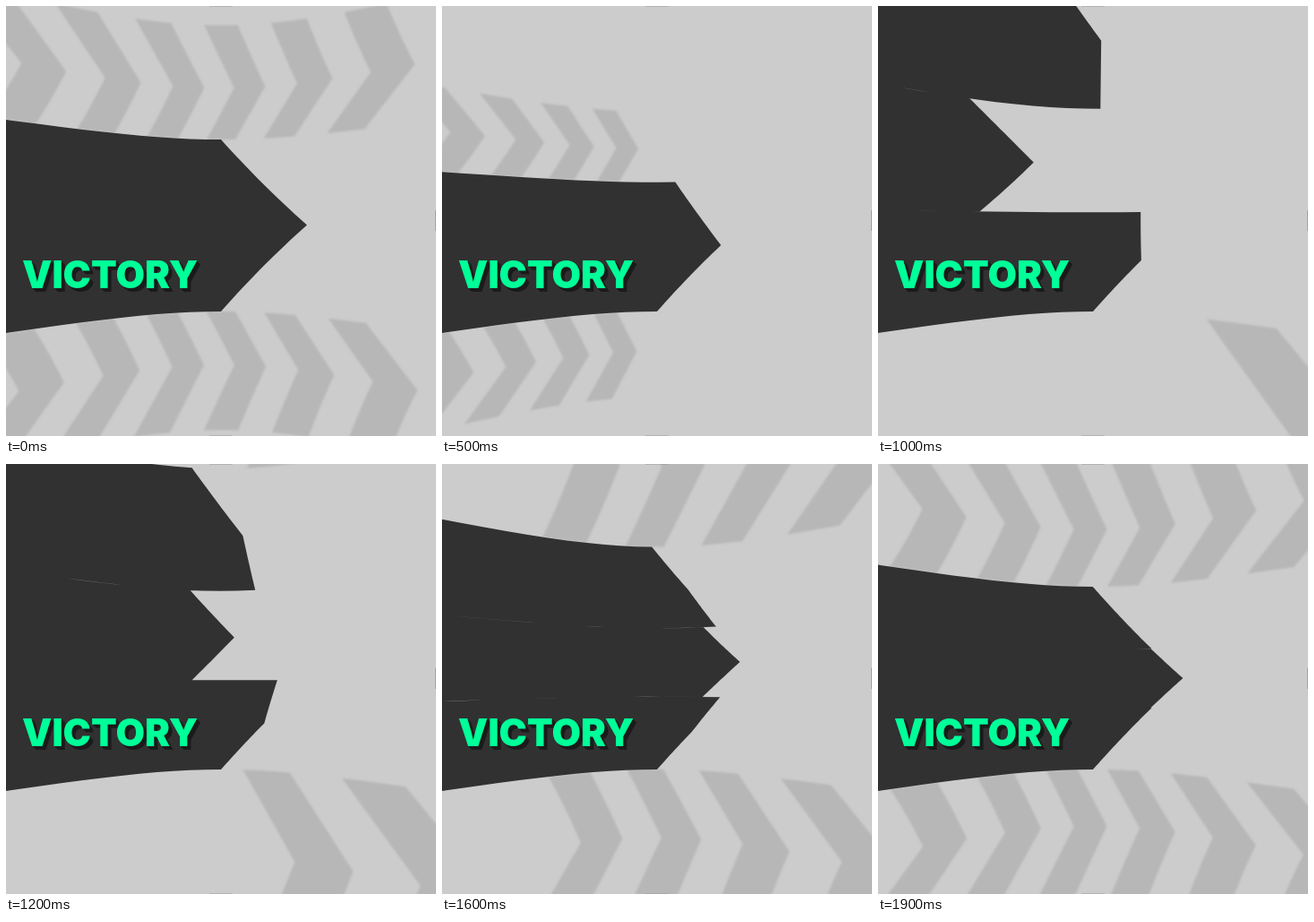
An HTML page with a canvas for the animation above (2 s loop, 480x480 px).

```html
<!DOCTYPE html>
<html lang="en">
<head>
<meta charset="utf-8">
<title>Victory</title>
<style>
  html, body { margin: 0; height: 100%; overflow: hidden; background: #ccc; }
  canvas { display: block; width: 100vw; height: 100vh; }
</style>
</head>
<body>
<canvas id="stage" width="480" height="480"></canvas>
<script>
const ctx = document.getElementById('stage').getContext('2d');
const LOOP = 2000, STEP = 100;
const CENTER = 240, BULGE = 7.7e-6;   // barrel lens over the whole stage
const FLOOR = 94.5, LEFT = -260;      // flat coordinates, relative to the centre
const ARROW = 180.5;                  // arrow height at the start of the loop

// Everything shrinks to a third per loop, towards the floor line.
const zoom = p => ARROW * 3 ** -p;
const easeInOut = p => (1 - Math.cos(Math.PI * p)) / 2;

function lens(x, y) {
  const k = 1 + BULGE * (x * x + y * y);
  return [CENTER + x * k, CENTER + y * k];
}

// Adds a polygon in flat coordinates, its edges bent by the lens.
function addShape(points) {
  points.forEach(([x, y], i) => {
    const [nextX, nextY] = points[(i + 1) % points.length];
    for (let u = 0; u < 1; u += 1 / 16) {
      const spot = lens(x + (nextX - x) * u, y + (nextY - y) * u);
      if (i || u) ctx.lineTo(...spot);
      else ctx.moveTo(...spot);
    }
  });
  ctx.closePath();
}

function addArrow(x, bottom, size, bottomSkew, topSkew) {
  addShape([
    [LEFT, bottom],
    [x + bottomSkew * size, bottom],
    [x + size / 2, bottom - size / 2],
    [x + topSkew * size, bottom - size],
    [LEFT, bottom - size]
  ]);
}

// Three stacked arrows join into one that is three times as high.
function drawArrows(p) {
  const size = zoom(p), whole = 3 * size;
  const skew = easeInOut(p), lag = whole * (1 - p) ** 2;
  ctx.fillStyle = '#313131';
  ctx.beginPath();
  addArrow(0, FLOOR, size, 0, skew);
  addArrow(size - 2.8 * lag, FLOOR - size, size, 0, 0);
  addArrow(-0.57 * lag, FLOOR - 2 * size, size, skew, 0);
  ctx.fill();
}

function addChevron(x, y, dir, size) {
  const half = size / 4, width = size / 6, push = size * 0.155;
  addShape([
    [x, y],
    [x + width, y],
    [x + width + push, y + dir * half],
    [x + width, y + dir * half * 2],
    [x, y + dir * half * 2],
    [x + push, y + dir * half]
  ]);
}

// Six chevrons above and below the arrow; p = 0 when they are centred.
function drawChevrons(p) {
  const size = zoom(p);
  const shift = -p * (2.75 + 0.58 * Math.exp(3.6 * p));
  ctx.beginPath();
  for (let n = -3; n <= 2; n++) {
    const x = size * (shift + n * 0.33 - 1 / 12);
    addChevron(x, FLOOR, 1, size);
    addChevron(x, FLOOR - size, -1, size);
  }
  ctx.fill();
}

function drawTitle() {
  ctx.font = '900 42px Inter, sans-serif';
  ctx.fillStyle = '#1b1b1b';
  for (let i = 4; i > 0; i--) ctx.fillText('VICTORY', 18 + i, 315 + i);
  ctx.fillStyle = '#00ff99';
  ctx.fillText('VICTORY', 18, 315);
}

function draw(p) {
  ctx.fillStyle = '#ccc';
  ctx.fillRect(0, 0, 480, 480);

  ctx.fillStyle = '#b7b7b7';
  ctx.filter = 'blur(1.2px)';
  drawChevrons(p - 1);
  drawChevrons(p);
  ctx.filter = 'none';

  drawArrows(p);

  // Slivers of the round rim
  ctx.fillStyle = '#999';
  ctx.fillRect(227, 0, 26, 0.5);
  ctx.fillRect(227, 479.5, 26, 0.5);
  ctx.fillRect(479.2, 228, 0.8, 23);

  drawTitle();
}

function frame() {
  draw(Math.floor(performance.now() % LOOP / STEP) * STEP / LOOP);
  requestAnimationFrame(frame);
}
frame();
</script>
</body>
</html>
```
